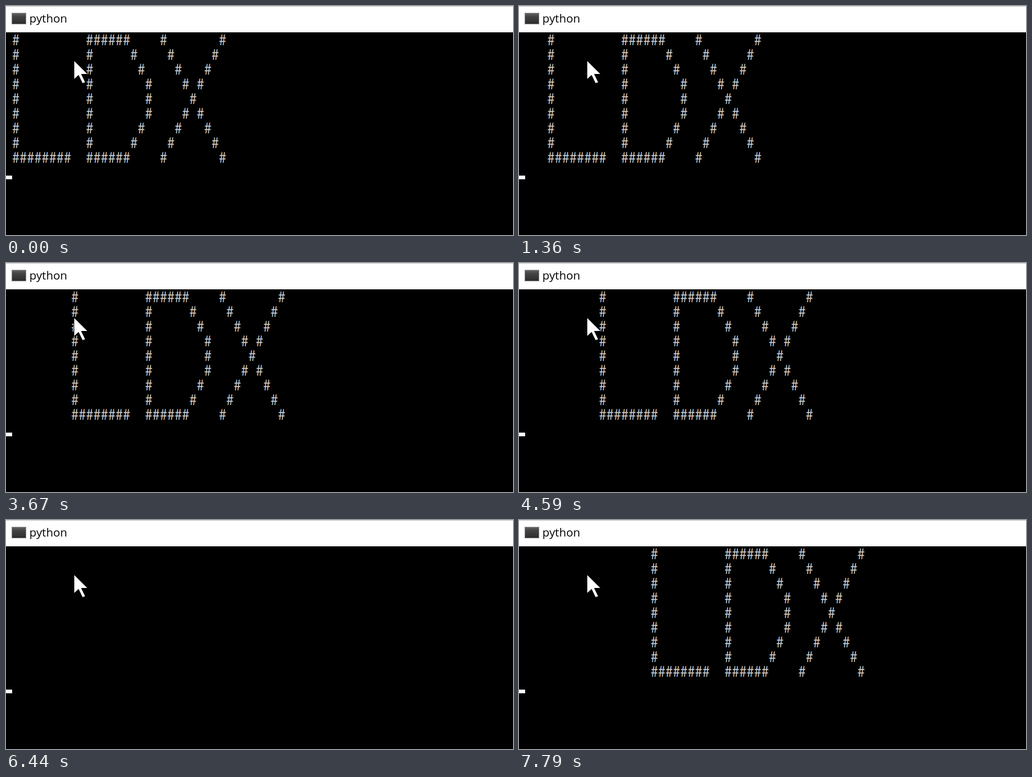
Animation, 824 px wide and 374 px high, one loop 8000 ms. Source, as an HTML page:

```html
<!DOCTYPE html>
<html lang="en">
<head>
<meta charset="utf-8">
<title>Scrolling banner</title>
<style>
  html, body { margin: 0; width: 100%; height: 100%; overflow: hidden; background: #000; }
  svg { display: block; width: 824px; height: 374px; }
  .title { font: 18.7px "Open Sans", "Noto Sans", sans-serif; }
  #banner {
    font: 24px "Noto Sans Mono CJK SC", "Noto Sans Mono CJK JP", "Noto Sans CJK SC", "Noto Sans CJK JP", monospace;
    text-rendering: geometricPrecision;
    isolation: isolate;
  }
  #banner g { mix-blend-mode: screen; }
</style>
</head>
<body>
<svg viewBox="0 0 824 374">
  <defs>
    <linearGradient id="shade" x2="0" y2="1">
      <stop stop-color="#666"/>
      <stop offset="0.3" stop-color="#444"/>
      <stop offset="1" stop-color="#2c2c2c"/>
    </linearGradient>
  </defs>
  <rect width="824" height="374"/>
  <g id="banner"></g>
  <rect id="caret" y="277" width="10" height="6" fill="#fff"/>
  <rect width="824" height="43" fill="#fff"/>
  <rect width="824" height="1" fill="#c4c4c4"/>
  <rect x="9.5" y="11.5" width="23" height="18" fill="url(#shade)" stroke="#999"/>
  <text class="title" x="38.1" y="27">python</text>
  <path d="M111 90 L132 111 H122 L128.5 124.5 L124.5 126 L118 112.5 L111 119 Z"
        fill="#fff" stroke="#000" stroke-width="1.6" paint-order="stroke"/>
</svg>
<script>
const LOOP = 8000, CELL = 12, ROW = 24;
const NS = "http://www.w3.org/2000/svg";
const banner = document.getElementById("banner");
const caret = document.getElementById("caret");

const top4 = [
  "#         ######    #       #",
  "#         #     #    #     #",
  "#         #      #    #   #",
  "#         #       #    # #"
];
const rows = [
  ...top4,
  "#         #       #     #",
  ...top4.slice(1).reverse(),
  "########  ######    #       #"
];

// One layer per colour channel, offset by a third of a pixel like subpixel text.
function addLayer(color, dx) {
  const g = document.createElementNS(NS, "g");
  g.setAttribute("fill", color);
  rows.forEach((row, r) => {
    for (const run of row.matchAll(/#+/g)) {
      const t = document.createElementNS(NS, "text");
      const xs = [...run[0]].map((_, i) => (run.index + i) * CELL + dx);
      t.setAttribute("x", xs.join(" "));
      t.setAttribute("y", 64 + r * ROW);
      t.textContent = run[0];
      g.append(t);
    }
  });
  banner.append(g);
}
addLayer("#d00000", 1 / 3);
addLayer("#00d000", 0);
addLayer("#0000d0", -1 / 3);

// Each step clears the screen, then reprints one cell further right.
const steps = [
  [380, 80], [830, 80], [1280, 80], [1810, 0], [2270, 0], [2730, 0],
  [3210, 0], [3670, 0], [4130, 0], [4590, 0], [5050, 80], [5500, 80],
  [5980, 60], [6440, 60], [6890, 60], [7340, 0], [7790, 0]
];

function draw(ms) {
  const t = ms % LOOP;
  const col = steps.filter(([at, gap]) => t >= at + gap).length;
  const blank = steps.some(([at, gap]) => t >= at && t < at + gap);
  banner.setAttribute("transform", `translate(${10 + col * CELL} 0)`);
  banner.setAttribute("visibility", blank ? "hidden" : "visible");
  caret.setAttribute("visibility", t >= 5050 && t < 5130 ? "hidden" : "visible");
}

const start = performance.now();
function tick() {
  draw(performance.now() - start);
  requestAnimationFrame(tick);
}
tick();
</script>
</body>
</html>
```
